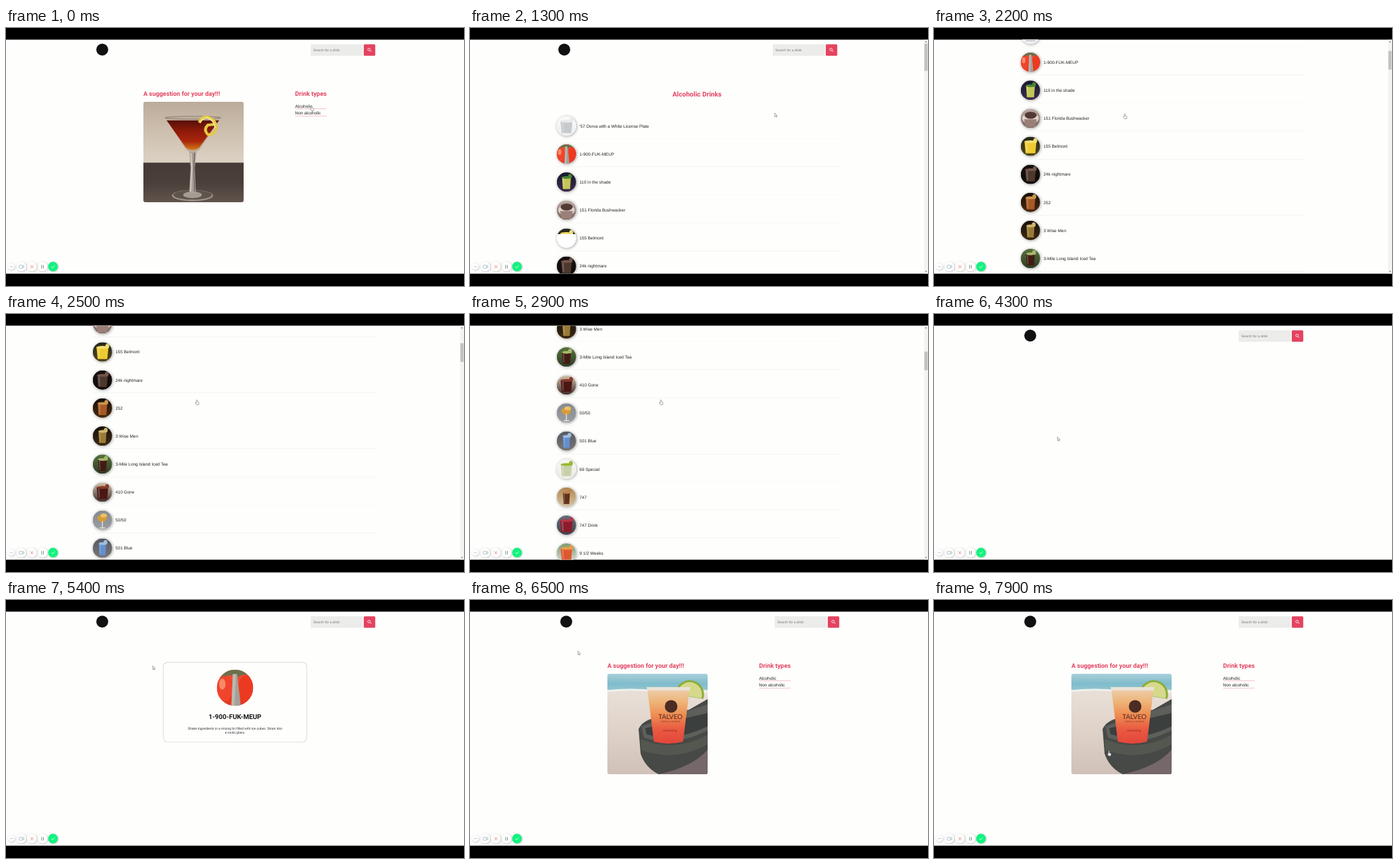
Recreate the animation shown at these times as an HTML page with a canvas. Size 690 by 388 pixels, loop 8 s.

```html
<!DOCTYPE html>
<html lang="en">
<head>
<meta charset="utf-8">
<title>Drink finder</title>
<style>
  html, body { margin: 0; width: 100%; height: 100%; overflow: hidden; background: #000; }
  canvas { display: block; }
</style>
</head>
<body>
<canvas id="stage" width="690" height="388"></canvas>
<script>
const c = document.getElementById('stage').getContext('2d');
const LOOP = 8000, STEP = 100;
const TOP = 17.4, HEIGHT = 352.2;
const PINK = '#e4435f', PAPER = '#fefefd';
const SANS = '"Liberation Sans", Arial, sans-serif', ROBOTO = 'Roboto, sans-serif';

// name, backdrop top, backdrop bottom, drink colour, glass width, garnish colour
const drinks = [
  ["'57 Dorva with a White License Plate", '#fafafa', '#eeeeee', '#c6cacc', .62, '#e8eaeb'],
  ['1-900-FUK-MEUP', '#ef5337', '#e2371f', '#a5a099', .3, '#6d6f4c'],
  ['110 in the shade', '#17182c', '#3d2d4c', '#c3c657', .46, '#488334'],
  ['151 Florida Bushwacker', '#bdaea6', '#74605a', '#e0d2cc', .85, '#543a35'],
  ['155 Belmont', '#25261a', '#51481d', '#efcb32', .62, '#f4df70'],
  ['24k nightmare', '#17110f', '#0f0b0a', '#4d382d', .55, '#75564b'],
  ['252', '#150e08', '#4a2c10', '#a85a25', .5, '#c99650'],
  ['3 Wise Men', '#171009', '#3d2b14', '#9a7a36', .42, '#d0b76f'],
  ['3-Mile Long Island Iced Tea', '#56733e', '#2f3b25', '#421b13', .46, '#a9b96a'],
  ['410 Gone', '#d3c3ac', '#40302a', '#4b1714', .6, '#8a3b2a'],
  ['50/50', '#858a90', '#9a9ea2', '#d79b37', .7, '#ecc166'],
  ['501 Blue', '#565a64', '#7b7574', '#638fce', .38, '#a2bce0'],
  ['69 Special', '#f7f7f3', '#ebece5', '#c7d1a9', .58, '#98b72f'],
  ['747', '#b08850', '#d6c3a4', '#60301a', .36, '#bb8452'],
  ['747 Drink', '#676f7a', '#42414a', '#8c1b2c', .65, '#b63947'],
  ['9 1/2 Weeks', '#7e9b70', '#dcdbd3', '#df5731', .6, '#ef9b45'],
];

const scrollKeys = [[1800, 0], [2200, 138], [2900, 420], [3000, 428], [3400, 2], [3500, 0]];
const cursorKeys = [
  [0, 461, 121], [100, 460, 131], [1300, 460, 131], [1800, 288, 133], [3500, 288, 133],
  [3700, 187, 188], [4600, 187, 188], [5400, 222, 102], [5900, 146, 38], [6100, 146, 38],
  [7800, 221, 216], [7900, 264, 231],
];

function sample(keys, t, i = 1) {
  if (t <= keys[0][0]) return keys[0][i];
  const next = keys.findIndex(k => k[0] > t);
  if (next < 0) return keys[keys.length - 1][i];
  const a = keys[next - 1], b = keys[next];
  return a[i] + (b[i] - a[i]) * (t - a[0]) / (b[0] - a[0]);
}

function text(str, x, y, font, color, align = 'left') {
  c.font = font;
  c.fillStyle = color;
  c.textAlign = align;
  c.fillText(str, x, y);
}

function rect(x, y, w, h, fill, radius = 0) {
  c.beginPath();
  c.roundRect(x, y, w, h, radius);
  c.fillStyle = fill;
  c.fill();
}

function oval(x, y, rx, ry, fill) {
  c.beginPath();
  c.ellipse(x, y, rx, ry, 0, 0, 7);
  c.fillStyle = fill;
  c.fill();
}

function wedge(x, y, r, from, to, fill) {
  c.beginPath();
  c.arc(x, y, r, from, to);
  c.fillStyle = fill;
  c.fill();
}

function shape(path, fill) {
  c.fillStyle = fill;
  c.fill(new Path2D(path));
}

function line(path, color, width = 1) {
  c.strokeStyle = color;
  c.lineWidth = width;
  c.stroke(new Path2D(path));
}

function fade(y0, y1, ...colors) {
  const g = c.createLinearGradient(0, y0, 0, y1);
  colors.forEach((color, i) => g.addColorStop(i / (colors.length - 1), color));
  return g;
}

function withShadow(blur, alpha, draw) {
  c.save();
  c.shadowColor = `rgba(0,0,0,${alpha})`;
  c.shadowBlur = blur;
  c.shadowOffsetX = c.shadowOffsetY = .7;
  draw();
  c.restore();
}

// Round drink picture on a unit circle scaled to r.
function thumb(drink, x, y, r) {
  const [name, top, bottom, liquid, w, garnish] = drink;
  c.save();
  c.translate(x, y);
  c.scale(r, r);
  c.beginPath();
  c.arc(0, 0, 1, 0, 7);
  c.clip();
  c.fillStyle = fade(-1, 1, top, bottom);
  c.fillRect(-1, -1, 2, 2);
  if (name.startsWith('1-900')) {
    shape('M-1-1H1V-.6Q.5-.85 .2-.6L-.3-.7-1-.45Z', garnish);
    oval(-.58, .05, .44, .7, '#f0442c');
    oval(.62, .05, .44, .75, '#ec3a22');
    oval(-.7, -.2, .18, .3, '#f88a68');
    shape('M-.12-.75H.12L.32 1H-.2Z', liquid);
    shape('M-.12-.75H.05L-.02 1H-.2Z', '#bcb8b0');
  } else if (name === '50/50') {
    shape('M-.55-.35Q0-.7 .5-.5Q.45 .2 0 .2T-.55-.35Z', liquid);
    oval(.12, -.48, .33, .2, garnish);
    line('M0 .1V.75M-.3.8H.3', '#e5e2dc', .1);
  } else if (name.startsWith('151')) {
    oval(0, 0, w, .55, liquid);
    oval(.02, -.32, .62, .36, garnish);
    shape('M-.65.1H.65L.5.9H-.5Z', '#9a8079');
  } else {
    shape(`M${-w}-.5H${w}L${w * .8} .72H${-w * .8}Z`, liquid);
    oval(0, -.48, w, .14, garnish);
    oval(w * .8, -.6, .2, .24, garnish);
    shape(`M${-w * .8}-.35H${-w * .5}L${-w * .45} .6H${-w * .65}Z`, 'rgba(255,255,255,.22)');
  }
  c.restore();
}

function martiniPhoto() {
  rect(207, 111, 151, 92, fade(111, 203, '#bbab9b', '#cec0af', '#dcd2c4'));
  rect(207, 202.5, 151, 60, fade(203, 262, '#463b37', '#4a3f3a', '#62544c'));
  oval(281, 252, 31, 8.5, '#9b918a');
  oval(281, 251, 29, 7, '#5f534e');
  oval(281, 251, 14, 5, '#a59b93');
  shape('M276 184H287L284.5 210 286 249H276L278 210Z', '#aaa097');
  line('M278.5 188L280 210 278 246', '#e3ddd4', 1.2);
  line('M284 188L283 210 284 246', '#665b55', 1.2);
  shape('M239 134H324L291 184Q281 190 272 184Z', '#bfae9e');
  shape('M242 139H321L291 180Q281 187 271 180Z', fade(139, 186, '#571109', '#8d190a', '#a8270b', '#dc8a1b'));
  c.beginPath();
  c.ellipse(281.5, 135, 42, 2.2, 0, 0, 7);
  c.strokeStyle = '#7b6d63';
  c.lineWidth = .8;
  c.stroke();
  line('M291 142Q294 133 303 134Q316 137 317 150Q314 162 304 160Q297 153 304 146L313 145', '#e5cb43', 4);
  line('M292 143Q296 136 303 135Q313 138 315 150', '#fbf0a5', 1.6);
}

function beachPhoto() {
  rect(207, 111, 151, 30, fade(111, 141, '#a9cfda', '#7fbccb', '#9ecbd2'));
  rect(207, 135, 151, 127, fade(135, 262, '#e8e0d8', '#dfd2c8', '#cfc0b8'));
  line('M207 137Q240 133 280 137T358 138', '#eef0ec', 3);
  shape('M254 194Q260 181 280 177L330 165 358 149V262H284Q264 252 257 231Z', '#474946');
  shape('M258 190Q290 179 358 157V196Q308 222 262 207Z', '#5d5f5a');
  shape('M264 193Q300 183 358 170V190Q308 214 266 202Z', '#3b3f3e');
  shape('M257 209Q308 230 358 203V217Q310 244 258 226Z', '#545650');
  shape('M284 262Q336 251 358 225V262Z', '#75676a');
  wedge(331, 142, 21.5, Math.PI, Math.PI * 2.1, '#8cab3a');
  wedge(331, 142, 18.5, Math.PI, Math.PI * 2.1, '#d6d98a');
  shape('M267 132H331L321 213Q299 219 277 213Z', fade(132, 215, '#ecd0b2', '#eeb578', '#ee8c50', '#ea5a41', '#e24739'));
  shape('M266 131H332L331 136H267Z', '#eae2d8');
  oval(303, 160, 9.5, 9.5, '#4c2b23');
  text('TALVEO', 302, 179.3, '10px Lato, sans-serif', '#512a23', 'center');
  text('HOTELS & RESORTS', 302, 183.7, '3.2px Lato, sans-serif', '#67342a', 'center');
  text('refreshing', 301, 198.2, '4.8px Lato, sans-serif', '#8c2b25', 'center');
}

function header(x) {
  oval(145 + x, 32.5, 9, 9, '#111');
  rect(459 + x, 24.5, 79, 17.2, '#ececeb', [1.5, 0, 0, 1.5]);
  text('Search for a drink', 463 + x, 34.8, `5.05px ${SANS}`, '#777');
  rect(539 + x, 24.5, 17.3, 17.2, PINK, 1.5);
  c.beginPath();
  c.arc(546.9 + x, 32.3, 1.9, 0, 7);
  c.strokeStyle = '#fff';
  c.lineWidth = .8;
  c.stroke();
  line(`M${548.3 + x} 33.7l2.2 2.2`, '#fff', .9);
}

function home(photo) {
  header(0);
  text('A suggestion for your day!!!', 207, 102.3, `bold 9.36px ${ROBOTO}`, PINK);
  text('Drink types', 435.5, 102.3, `bold 9.36px ${ROBOTO}`, PINK);
  ['Alcoholic', 'Non alcoholic'].forEach((label, i) => {
    const y = 119.6 + i * 10.8;
    text(label, 435.5, y, `6.47px ${SANS}`, '#222');
    rect(435.5, y + 1.7, 47.5, .4, '#e58b9e');
  });
  c.save();
  c.beginPath();
  c.roundRect(207, 111, 151, 151, 3);
  c.clip();
  photo();
  c.restore();
}

function list(t) {
  const scroll = sample(scrollKeys, t);
  c.save();
  c.translate(0, -scroll);
  header(-3);
  text('Alcoholic Drinks', 342, 103.4, `bold 10.1px ${ROBOTO}`, PINK, 'center');
  drinks.forEach((drink, i) => {
    const y = 147.4 + i * 42.15;
    withShadow(4, .38, () => oval(145.3, y, 14.8, 14.8, '#fff'));
    thumb(drink, 145.3, y, 14.6);
    if (drink[0] === '155 Belmont' && t < 1400) {
      wedge(145.3, y, 14.8, -.42, Math.PI + .42, '#fff');
    }
    text(drink[0], 165, y + 2.3, `6.45px ${SANS}`, '#222');
    rect(131, y + 19, 428, .4, '#e9e9e9');
  });
  c.restore();
  rect(684, TOP, 6, HEIGHT, '#f3f3f3');
  rect(684.6, 23.6 + scroll * .0785, 4.8, t < 1800 ? 41 : 28, '#c1c1c1');
  shape('M685.6 21.5L687 19.5 688.4 21.5Z', '#777');
  shape('M685.6 365.5L687 367.5 688.4 365.5Z', '#777');
}

function detail() {
  header(0);
  rect(236.5, 93.3, 217, 121, '#d8d8d8', 7);
  rect(237.4, 94.2, 215.2, 119.2, PAPER, 6.2);
  thumb(drinks[1], 345, 132, 27.3);
  text(drinks[1][0], 345, 178.8, `bold 10px ${ROBOTO}`, '#181818', 'center');
  text('Shake ingredients in a mixing tin filled with ice cubes. Strain into', 345, 194.8, `5.03px ${ROBOTO}`, '#333', 'center');
  text('a rocks glass.', 345, 200.8, `5.03px ${ROBOTO}`, '#333', 'center');
}

function recorderBar() {
  const y = 358.8;
  [[8, 5], [23.3, 7.3], [39, 7.3], [55, 7.3], [70.8, 7.3]].forEach(([x, r], i) =>
    withShadow(3, .25, () => oval(x, y, r, r, i === 4 ? '#12f27f' : '#fff')));
  line(`M5.8 ${y}h4.4`, '#aaa', .7);
  line('M20 356.8h4.8v4.4h-4.8ZM24.8 358.3l2.2-1v3.4l-2.2-1', '#8ea2a8', .6);
  line('M36.5 356.5l5 5m0-5l-5 5', '#f07b73', .8);
  line('M53.7 356.3v5.4m2.6-5.4v5.4', '#6c817c', .9);
  line('M68.3 359l1.8 1.8 3.4-3.6', '#fff', .9);
}

function cursor(t) {
  const hand = t < 100 || (t >= 1800 && t < 4300) || (t >= 5800 && t < 6200) || t >= 7200;
  c.save();
  c.translate(sample(cursorKeys, t, 1), sample(cursorKeys, t, 2));
  c.lineJoin = 'round';
  const path = hand
    ? 'M-1.2-3.5Q-.5-4.3.1-3.5V-1L2.2-.5Q3-.2 2.8.7L2.2 3.5H-1L-2.8.6Q-2.5-.3-1.2.6Z'
    : 'M-1-3.2V2.4L.3 1.2 1.2 3.2 2.1 2.8 1.2.9H2.9Z';
  shape(path, '#fff');
  line(path, '#666', .55);
  c.restore();
}

function page(t) {
  if (t < 700) home(martiniPhoto);
  else if (t < 900) header(0);
  else if (t < 4200) list(t);
  else if (t < 4600) header(0);
  else if (t < 6100) detail();
  else if (t < 6200) header(0);
  else home(beachPhoto);
}

function frame(now) {
  const t = Math.floor(now % LOOP / STEP) * STEP;
  c.textRendering = 'geometricPrecision';
  c.fillStyle = '#000';
  c.fillRect(0, 0, 690, 388);
  c.save();
  c.beginPath();
  c.rect(0, TOP, 690, HEIGHT);
  c.clip();
  c.fillStyle = PAPER;
  c.fillRect(0, 0, 690, 388);
  page(t);
  recorderBar();
  cursor(t);
  c.restore();
  requestAnimationFrame(frame);
}
requestAnimationFrame(frame);
</script>
</body>
</html>
```
